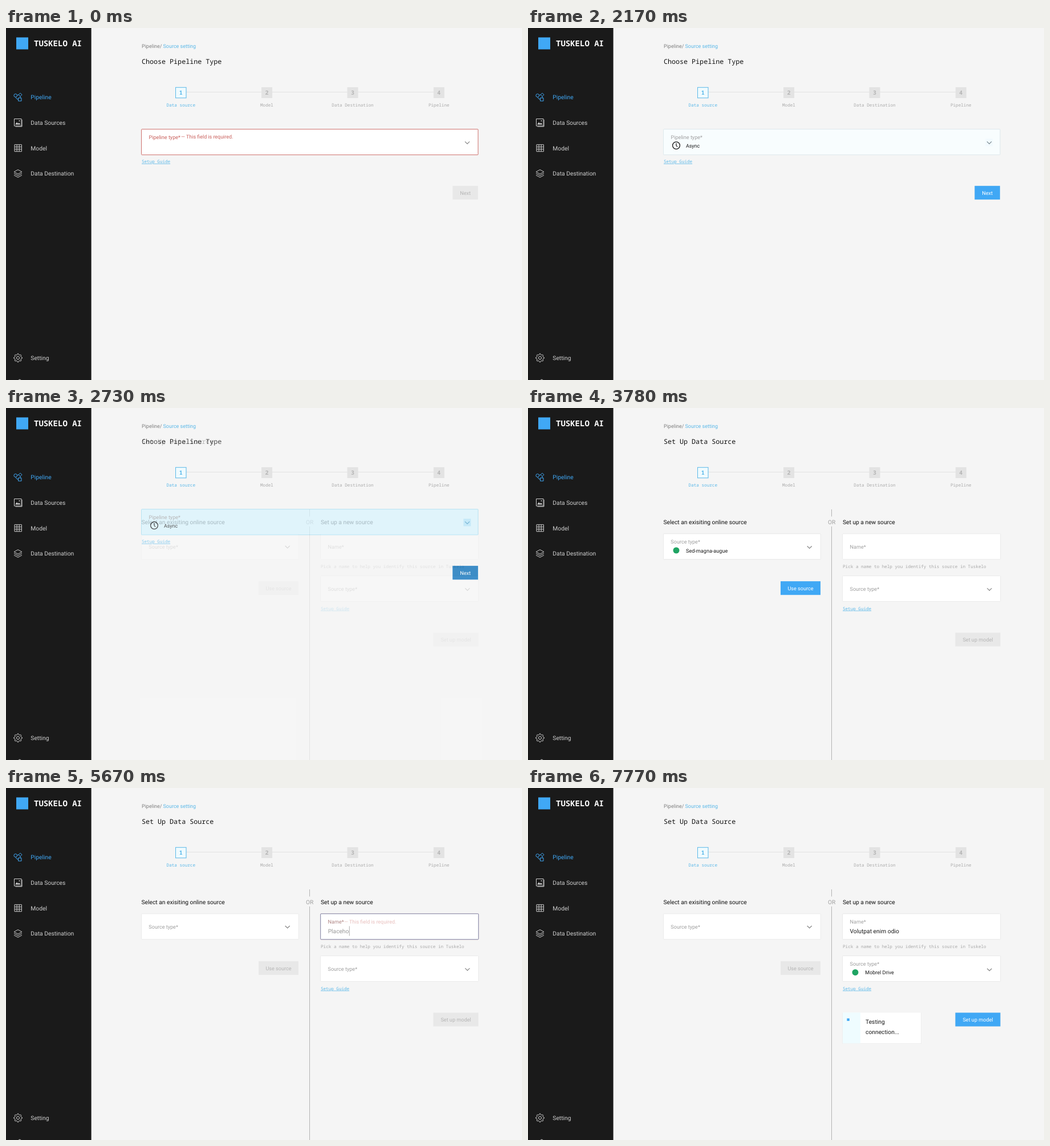
These frames come from a looping animation (905 px wide and 618 px high, 8 s). An HTML page:

```html
<!DOCTYPE html>
<html lang="en">
<head>
<meta charset="utf-8">
<title>Pipeline setup</title>
<style>
  html, body { margin: 0; width: 100%; height: 100%; overflow: hidden; background: #f5f5f5; }
  svg { display: block; width: 100vw; height: 100vh; font-family: Roboto, sans-serif; text-rendering: geometricPrecision; }
  .mono { font-family: "Noto Sans Mono", monospace; }
  .mid { text-anchor: middle; }
  .link { text-decoration: underline; }
  .title { font-weight: 500; }
  .bold { font-weight: 700; }
  .line { fill: none; }
</style>
</head>
<body>
<svg id="stage" viewBox="0 0 905 618"></svg>
<script>
const BLUE = '#40a8f5', DARK = '#006ab7', PAGE = '#f5f5f5', INK = '#1a1a1a';
const GREY = '#a0a0a0', EDGE = '#e9e9e9', RED = '#c9605c', SKY = '#5bb8e8';
const LOOP = 8000, STEP = 70;

// Drawing helpers; text y is the middle of the capitals.
const text = (x, y, s, size, fill, cls = '') =>
  `<text x="${x}" y="${y + size * .355}" font-size="${size}" fill="${fill}" class="${cls}">${s}</text>`;
const rect = (x, y, w, h, fill, stroke = 'none') =>
  `<rect x="${x}" y="${y}" width="${w}" height="${h}" fill="${fill}" stroke="${stroke}"/>`;
const path = (d, stroke, width = 1) =>
  `<path class="line" d="${d}" stroke="${stroke}" stroke-width="${width}"/>`;
const dot = (x, y, r, fill) => `<circle cx="${x}" cy="${y}" r="${r}" fill="${fill}"/>`;
const field = (x, y, w, stroke = EDGE, fill = '#fff') =>
  `<rect x="${x}" y="${y}" width="${w}" height="45" rx="1" fill="${fill}" stroke="${stroke}" stroke-width=".9"/>`;
const chevron = (x, y, stroke = '#858585') => path(`M${x - 4} ${y - 2}l4 4 4-4`, stroke, 1.2);
const button = (x, y, w, label, fill, ink = '#fff') =>
  rect(x, y, w, 24, fill) + text(x + w / 2, y + 12.2, label, 9.1, ink, 'mid');
const offButton = (x, y, w, label) => button(x, y, w, label, '#e8e8e8', '#b5b5b5');
const guide = (x, y) => text(x, y, 'Setup Guide', 7.6, SKY, 'mono link');
const title = s => text(238, 58.5, s, 11.7, '#111', 'mono title');
const clock = (x, y) =>
  `<circle cx="${x}" cy="${y}" r="6.4" class="line" stroke="${INK}" stroke-width="1.3"/>` +
  path(`M${x} ${y - 4}v4l2 2.4`, INK, 1.2);

function sidebar() {
  const pale = '#cfcfcf';
  const items = [['Pipeline', 121.5, BLUE], ['Data Sources', 166.5, pale], ['Model', 211, pale],
    ['Data Destination', 255.5, pale], ['Setting', 579.5, pale]];
  let gear = '';
  for (let i = 0; i <= 32; i++) {
    const a = (i - .5) * Math.PI / 16, r = i % 4 < 2 ? 7.4 : 5.6;
    gear += `${i ? 'L' : 'M'}${(21 + r * Math.cos(a)).toFixed(1)} ${(579.2 + r * Math.sin(a)).toFixed(1)}`;
  }
  return rect(0, 0, 149.6, 618, INK) + rect(18, 16.5, 21, 21, BLUE) +
    text(49, 27.5, 'TUSKELO AI', 14, '#fff', 'mono bold') +
    items.map(([s, y, c]) => text(43.3, y, s, 10.3, c)).join('') +
    path('M19.5 118.5a2.8 2.8 0 1 1-5.6 0a2.8 2.8 0 1 1 5.6 0M25 114.2l3 3-3 3-3-3zM21.5 122.8h5.5v5.3h-5.5zM19.5 118l2.6-.7M25 120.2v2.6M17 121.3q1 4 4.5 4', BLUE) +
    path('M14.5 159.5h12.5v12.5h-12.5zM28 161v12h-11.5', pale) +
    `<path d="M16 169.5l3-4 2.2 2.4 1.6-1.7 2.6 3.3z" fill="${pale}"/>` + dot(23.5, 163, 1, pale) +
    path('M15 204.8h12.4v12h-12.4zM15 208.8h12.4M15 212.8h12.4M19.1 204.8v12M23.2 204.8v12', pale) +
    path('M21 248.8l7 3.8-7 3.8-7-3.8zM14 255.4l7 3.8 7-3.8M14 258.4l7 3.8 7-3.8', pale) +
    path(gear, pale) + `<circle cx="21" cy="579.2" r="2.6" class="line" stroke="${pale}"/>` +
    path('M20.5 619l3.5-2 3.5 2', pale);
}

function stepper() {
  const steps = [['Data source', 306.8], ['Model', 457.5], ['Data Destination', 608], ['Pipeline', 759.3]];
  return path('M316 112.5H750', '#dedede', .8) + steps.map(([s, x], i) =>
    (i ? rect(x - 9.5, 104, 19, 19, '#e3e3e3') : rect(x - 9.3, 104.3, 18.5, 18.5, '#effbff', SKY)) +
    text(x, 113.5, i + 1, 10, i ? '#b4b4b4' : SKY, 'mono mid bold') +
    text(x, 135, s, 7.65, i ? '#ababab' : SKY, 'mono mid')).join('');
}

const shell = sidebar() + text(238, 31.5, 'Pipeline/', 9, '#808080') +
  text(275.5, 31.5, 'Source setting', 9, SKY) + stepper() +
  title('Choose Pipeline Type') + guide(238, 234.5) + offButton(783.4, 277.2, 44.4, 'Next');

const typeField = (stroke, fill) => field(237.5, 177.7, 590.5, stroke, fill) +
  text(250.5, 191.3, 'Pipeline type*', 9.1, GREY) + chevron(809, 201.3);
const asyncValue = clock(260, 206.3) + text(277, 206.8, 'Async', 8.9, INK);

const typeError = field(237.5, 177.7, 590.5, RED) + text(250.5, 191.3, 'Pipeline type*', 9.1, RED) +
  text(307, 191.3, '— This field is required.', 8.95, RED) + chevron(809, 201.3);

const typeMenu = typeField(BLUE) + rect(237.5, 223, 590.5, 78.5, '#fff', EDGE) +
  clock(260, 253) + text(277, 253.5, 'Async', 8.9, INK) +
  clock(260, 284) + text(277, 284.5, 'Sync', 8.9, INK);

const typeChosen = typeField() + asyncValue + button(783.4, 277.2, 44.4, 'Next', BLUE);
const typeHover = typeField('#9cdcf2', '#daf4fe') + asyncValue +
  rect(802.3, 194.5, 13, 13, '#b5e5fa') + chevron(809, 201.3, '#4d9fc9');

const sourceScreen = rect(237, 48, 593, 24, PAGE) + rect(235, 160, 600, 458, PAGE) +
  title('Set Up Data Source') +
  path('M532.5 178v12.5M532.5 208V618', '#b2b2b2') + text(532.7, 200, 'OR', 10.2, GREY, 'mid') +
  text(237.5, 200, 'Select an exisiting online source', 10.25, '#111') +
  text(552, 200, 'Set up a new source', 10.25, '#111') +
  field(237.5, 220.8, 275.7) + text(250.3, 243.8, 'Source type*', 9.1, GREY) + chevron(493.7, 244) +
  offButton(443, 304.2, 70, 'Use source') +
  field(551.7, 220.8, 277) + text(564.5, 243.8, 'Name*', 9.1, GREY) +
  text(552, 278, 'Pick a name to help you identify this source in Tuskelo', 7.63, '#a8a8a8', 'mono') +
  field(551.7, 294.7, 277) + text(564.5, 317.8, 'Source type*', 9.1, GREY) + chevron(809.3, 318.3) +
  guide(552, 352) + offButton(749.5, 394.5, 79, 'Set up model');

const sourcePicked = field(237.5, 220.8, 275.7) + text(250.3, 235, 'Source type*', 9.1, GREY) +
  dot(260, 250, 5.5, '#1fa463') + text(277, 250.3, 'Sed-magna-augue', 9.1, INK) + chevron(493.7, 244.5) +
  button(443, 304.2, 70, 'Use source', BLUE);

const nameField = (stroke, ink = GREY) => field(551.7, 220.8, 277, stroke) + text(564.5, 235, 'Name*', 9.1, ink);
const nameError = nameField(RED, RED) + text(593, 235, '— This field is required.', 8.95, RED);
const nameFocus = nameField('#3f96d8') + text(564.7, 251.2, 'Placeho', 10.2, '#555') +
  path('M602.3 242.5v17', '#777');
const formFilled = nameField() + text(564.5, 251.2, 'Volutpat enim odio', 10.3, INK) +
  field(551.7, 294.7, 277) + text(564.5, 309, 'Source type*', 9.1, GREY) +
  dot(574, 323.7, 5.5, '#1fa463') + text(591.3, 324.2, 'Mobrel Drive', 9, INK) + chevron(809.3, 319) +
  button(749.5, 394.5, 79, 'Set up model', BLUE);

const testing = rect(551.5, 394.5, 138.5, 54.5, '#e9e9e9') + rect(552, 394.3, 137.3, 54, '#fff') +
  rect(552, 394.3, 31, 54, '#effcff') +
  text(592, 410.2, 'Testing', 10.3, INK) + text(592, 428.2, 'connection...', 10.3, INK) +
  `<rect id="spinner" width="4.4" height="4.4" fill="${BLUE}"/>`;

// Timing helpers
const ramp = (t, from, to) => Math.min(1, Math.max(0, (t - from) / (to - from)));
const during = (t, from, to = LOOP) => +(t >= from && t < to);

// Layers from back to front, each with its opacity over time
const layers = [
  [shell, () => 1],
  [typeError, t => during(t, 0, 350)],
  [typeMenu, t => during(t, 350, 1190)],
  ['<circle id="pulse" cx="279" cy="259" fill="#888"/>', t => during(t, 700, 1050) * .45 * (1 - ramp(t, 700, 1050))],
  [typeChosen, t => during(t, 1190, 2940)],
  [typeHover, t => during(t, 0, 2940) * ramp(t, 2100, 2520)],
  [button(783.4, 277.2, 44.4, 'Next', DARK), t => during(t, 0, 2940) * ramp(t, 2380, 2710)],
  [sourceScreen, t => ramp(t, 2660, 2940)],
  [sourcePicked, t => during(t, 3780, 4340)],
  [nameError, t => during(t, 0, 5950) * ramp(t, 5110, 5460)],
  [nameFocus, t => during(t, 0, 5950) * ramp(t, 5460, 5810)],
  [formFilled, t => ramp(t, 5740, 5950)],
  [button(749.5, 394.5, 79, 'Set up model', DARK), t => during(t, 6580) * (1 - ramp(t, 6860, 7070))],
  [testing, t => ramp(t, 6860, 7070)],
];

const stage = document.getElementById('stage');
stage.innerHTML = layers.map(([body]) => `<g>${body}</g>`).join('');
const groups = [...stage.children];
const pulse = document.getElementById('pulse');
const spinner = document.getElementById('spinner');
const hops = [[0, 560.3, 405], [7210, 562.8, 402.5], [7490, 565.3, 402.5], [7770, 559.4, 404.5]];

function draw(now) {
  const t = Math.floor(now % LOOP / STEP) * STEP;
  groups.forEach((g, i) => {
    const opacity = layers[i][1](t);
    g.setAttribute('opacity', opacity);
    g.setAttribute('display', opacity ? 'inline' : 'none');
  });
  pulse.setAttribute('r', 7 + 11 * ramp(t, 700, 980));
  const [, x, y] = hops.filter(h => t >= h[0]).pop();
  spinner.setAttribute('x', x);
  spinner.setAttribute('y', y);
  requestAnimationFrame(draw);
}
draw(performance.now());
</script>
</body>
</html>
```
